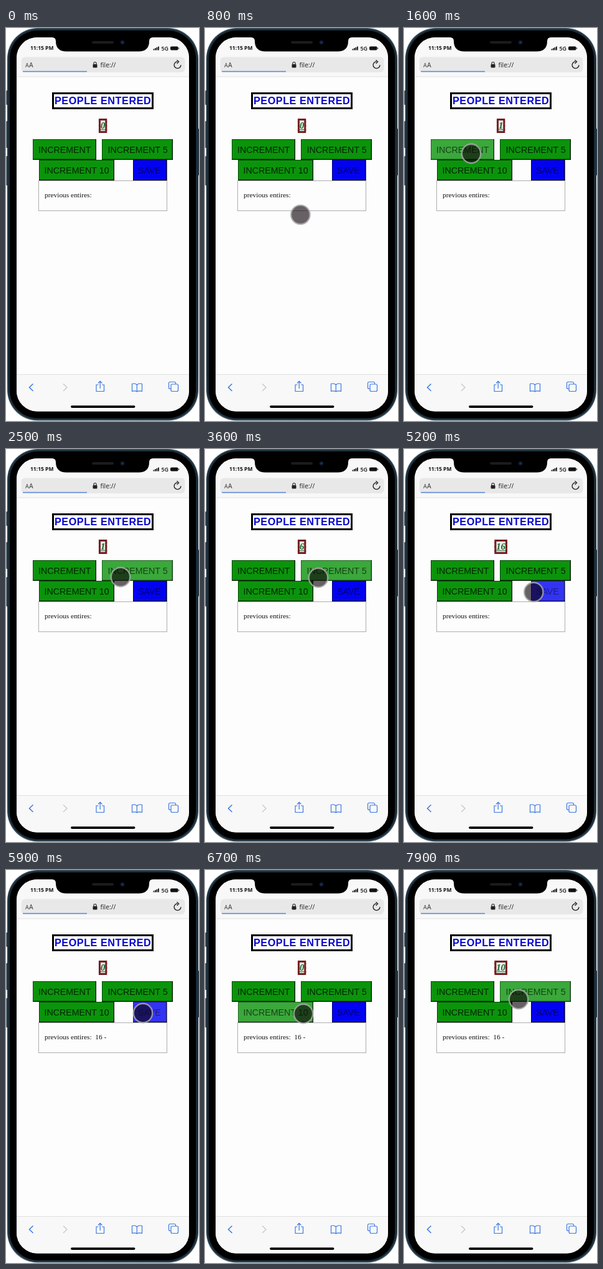
Write an HTML page with a canvas that moves like this. It is 310x629 px and loops after 8000 ms.

```html
<!DOCTYPE html>
<html lang="en">
<head>
<meta charset="utf-8">
<title>People counter</title>
<style>
html, body { margin: 0; width: 100%; height: 100%; overflow: hidden; background: #fff; }
canvas { display: block; width: 100%; height: 100%; }
</style>
</head>
<body>
<canvas id="stage"></canvas>
<script>
const W = 310, H = 629, LOOP = 8000, STEP = 100;
const canvas = document.getElementById('stage');
const ctx = canvas.getContext('2d');
const SANS = '"Liberation Sans", Arial, sans-serif';
const SERIF = '"Liberation Serif", Times, serif';
const UI = '"Open Sans", "Noto Sans", sans-serif';
const BLUE = '#3e78e0';
const GREEN = '#0b940b', GREEN_INK = 'rgba(0,0,0,.76)';

const buttons = [
  { label: 'INCREMENT', x: 43, y: 178, w: 102, tx: 52, fill: GREEN, ink: GREEN_INK },
  { label: 'INCREMENT 5', x: 154, y: 178, w: 114, tx: 163.5, fill: GREEN, ink: GREEN_INK },
  { label: 'INCREMENT 10', x: 53, y: 211, w: 121, tx: 61.5, fill: GREEN, ink: GREEN_INK },
  { label: 'SAVE', x: 204, y: 211, w: 54.5, tx: 212, fill: '#0202f2', ink: 'rgba(0,0,0,.55)' }
];
const BUTTON_H = 33;

// pointer stops: time, x, y
const path = [
  [400, 205, 420], [500, 178, 352], [600, 178, 352], [1100, 108, 201],
  [2100, 108, 201], [2500, 184, 205], [3500, 184, 205], [3600, 182, 206],
  [4000, 145, 229], [4900, 145, 229], [5300, 220, 229], [6300, 220, 229],
  [6700, 158, 230], [7700, 158, 230], [7900, 184, 207]
];
const presses = [[1400, 1600], [2900, 3100], [4300, 4500], [5700, 5900], [7000, 7300]];
const counts = [[0, 0], [1600, 1], [3100, 6], [4500, 16], [5900, 0], [7300, 10]];
const SAVED_AT = 5900;

function pointerAt(t) {
  if (t < path[0][0]) return null;
  const i = path.findIndex(p => p[0] > t);
  if (i < 0) return path[path.length - 1].slice(1);
  const [t0, x0, y0] = path[i - 1], [t1, x1, y1] = path[i];
  const u = (t - t0) / (t1 - t0), k = u * u * (3 - 2 * u);
  return [x0 + (x1 - x0) * k, y0 + (y1 - y0) * k];
}

function countAt(t) {
  return counts.filter(c => c[0] <= t).pop()[1];
}

function rect(x, y, w, h, color) {
  ctx.fillStyle = color;
  ctx.fillRect(x, y, w, h);
}

function round(x, y, w, h, r, color) {
  ctx.fillStyle = color;
  ctx.beginPath();
  ctx.roundRect(x, y, w, h, r);
  ctx.fill();
}

function disc(x, y, r, color) {
  ctx.fillStyle = color;
  ctx.beginPath();
  ctx.arc(x, y, r, 0, Math.PI * 2);
  ctx.fill();
}

function text(str, x, y, font, color, spacing = 0) {
  ctx.font = font;
  ctx.letterSpacing = spacing + 'px';
  ctx.fillStyle = color;
  ctx.fillText(str, x, y);
}

function stroke(d, color, width) {
  ctx.strokeStyle = color;
  ctx.lineWidth = width;
  ctx.stroke(new Path2D(d));
}

function drawBody() {
  for (const [y, h] of [[100, 23], [149, 43], [205, 47]]) round(0.5, y, 4, h, 1, '#2b3b47');
  round(306, 161, 4, 75, 1, '#2b3b47');
  const metal = ctx.createLinearGradient(0, 0, 0, H);
  metal.addColorStop(0, '#3d5261');
  metal.addColorStop(0.12, '#20323f');
  metal.addColorStop(0.88, '#20323f');
  metal.addColorStop(1, '#4c6372');
  round(2, 0, 307, 628.5, 49, metal);
  round(3.5, 1.5, 304, 625.5, 47.5, '#1b2c38');
  round(6, 4, 299, 620.5, 45, '#000');
}

function drawNotch() {
  ctx.fillStyle = '#000';
  ctx.fill(new Path2D('M74 14H236V15Q230 15 230 21Q230 37.5 213 37.5H97Q80 37.5 80 21Q80 15 74 15Z'));
  round(138, 21, 35, 4, 2, '#1c1c1f');
  disc(187, 23, 3.6, '#0b1525');
  disc(187, 23, 1.8, '#1c3658');
}

function drawStatus() {
  text('11:15 PM', 39, 35.3, '700 8.5px ' + UI, '#111');
  for (let i = 0; i < 4; i++) rect(236.5 + i * 2.5, 33.5 - i * 1.3, 1.8, 2 + i * 1.3, '#111');
  text('5G', 249.5, 35.6, '600 8.8px ' + UI, '#111');
  round(264, 29.5, 12.5, 6, 1.8, '#111');
  rect(277, 31.5, 1.2, 2, '#333');
}

function drawAddressBar() {
  rect(17, 15, 277, 63, '#f8f8f8');
  rect(17, 77.5, 277, 1, '#e3e3e3');
  round(24.5, 46.5, 263, 24.5, 6, '#e8e8e9');
  text('A', 31, 63.3, '9px ' + UI, '#333');
  text('A', 37, 63.3, '10.5px ' + UI, '#333');
  round(139.5, 58, 7, 5.5, 1, '#222');
  stroke('M141 58.5V56.5A2 2 0 0 1 145 56.5V58.5', '#222', 1.2);
  text('file://', 151.5, 62.8, '10.3px ' + UI, '#222');
  stroke('M275.5 53.8A5.4 5.4 0 1 0 280.9 59.2', '#222', 1.4);
  stroke('M274.5 51.2L277.6 54L274.5 57', '#222', 1.3);
  rect(27, 68.8, 103, 1.6, '#5d8ade');
}

function drawToolbar() {
  rect(17, 554, 277, 60, '#f8f8f8');
  rect(17, 554, 277, 1, '#e0e0e0');
  stroke('M43.5 569.5L37.5 575.3L43.5 581', BLUE, 1.5);
  stroke('M92 569.5L98 575.3L92 581', '#c9c9cb', 1.4);
  stroke('M148.5 571H145V581.5H157.5V571H154M151.2 577V565.5M148 568.5L151.2 565.3L154.4 568.5', BLUE, 1.2);
  stroke('M210.3 571Q207 568 202.5 569.5V581.5Q207 580 210.3 582Q213.5 580 218.5 581.5V569.5Q213.5 568 210.3 571V582', BLUE, 1.2);
  ctx.beginPath();
  ctx.roundRect(265, 570, 11.5, 11.5, 2);
  ctx.stroke();
  stroke('M265 577.5H263.5Q261.5 577.5 261.5 575.5V568.5Q261.5 566.5 263.5 566.5H270.5Q272.5 566.5 272.5 568.5V570', BLUE, 1.2);
  round(104, 604.3, 103.5, 3.6, 1.8, '#000');
}

function drawTitle() {
  rect(74, 103, 163, 27, '#000');
  rect(77, 106, 157, 21, '#fff');
  text('PEOPLE ENTERED', 78, 122, 'bold 16.2px ' + SANS, '#0606cc', 0.55);
}

// Alternating dashes with a solid piece at every corner
function dashedFrame(x, y, w, h, b, color, gap) {
  rect(x, y, w, h, color);
  const pieces = len => 2 * Math.round(len / 8) + 1;
  const nx = pieces(w), ny = pieces(h), dx = w / nx, dy = h / ny;
  for (let i = 1; i < nx; i += 2)
    for (const edge of [y, y + h - b]) rect(x + i * dx, edge, dx, b, gap);
  for (let i = 1; i < ny; i += 2)
    for (const edge of [x, x + w - b]) rect(edge, y + i * dy, b, dy, gap);
}

function drawCounter(n) {
  const str = String(n), inner = 7.3 * str.length, w = inner + 6;
  const x = 155.6 - w / 2, y = 145, h = 23;
  dashedFrame(x, y, w, h, 3, '#8e121b', '#5b2a2a');
  rect(x + 3, y + 3, inner, h - 6, '#e4ebe4');
  text(str, x + 3, 161, 'italic bold 14.6px ' + SERIF, '#1c5f28');
  rect(x + 3, 162.3, inner, 1, '#1c5f28');
}

function drawButton(b, hover) {
  ctx.globalAlpha = hover ? 0.8 : 1;
  rect(b.x, b.y, b.w, BUTTON_H, b.fill);
  text(b.label, b.tx, b.y + 21.5, '14.2px ' + SANS, b.ink);
  const light = 'rgba(0,0,0,.5)', dark = 'rgba(0,0,0,.85)';
  rect(b.x, b.y, b.w, 1, light);
  rect(b.x, b.y + 1, 1, BUTTON_H - 1, light);
  rect(b.x + b.w - 1.3, b.y, 1.3, BUTTON_H, dark);
  rect(b.x, b.y + BUTTON_H - 1.3, b.w, 1.3, dark);
  ctx.globalAlpha = 1;
}

function drawEntries(saved) {
  ctx.strokeStyle = '#adadad';
  ctx.lineWidth = 1;
  ctx.strokeRect(52.5, 244.5, 206, 48);
  text('previous entires:' + (saved ? '\u00a0 16 -' : ''), 62, 270.6, '11.4px ' + SERIF, '#111');
}

function drawPointer([x, y], pressed) {
  const r = pressed ? 13.5 : 15.2;
  disc(x, y, r, 'rgba(12,0,8,.62)');
  ctx.strokeStyle = 'rgba(172,172,172,.82)';
  ctx.lineWidth = 2.4;
  ctx.beginPath();
  ctx.arc(x, y, r, 0, Math.PI * 2);
  ctx.stroke();
}

function draw(t) {
  const pointer = pointerAt(t);
  const over = b => pointer && pointer[0] >= b.x && pointer[0] < b.x + b.w &&
    pointer[1] >= b.y && pointer[1] < b.y + BUTTON_H;

  rect(0, 0, W, H, '#fff');
  drawBody();
  ctx.save();
  ctx.beginPath();
  ctx.roundRect(17, 15, 277, 598.5, 33);
  ctx.clip();
  rect(17, 15, 277, 599, '#fdfdfd');
  drawAddressBar();
  drawStatus();
  drawTitle();
  drawCounter(countAt(t));
  drawEntries(t >= SAVED_AT);
  buttons.forEach(b => drawButton(b, over(b)));
  drawToolbar();
  if (pointer) drawPointer(pointer, presses.some(([a, b]) => t >= a && t < b));
  ctx.restore();
  drawNotch();
}

function resize() {
  const dpr = window.devicePixelRatio || 1;
  canvas.width = Math.round(innerWidth * dpr);
  canvas.height = Math.round(innerHeight * dpr);
}

const start = performance.now();
function frame() {
  const t = (performance.now() - start) % LOOP;
  ctx.setTransform(canvas.width / W, 0, 0, canvas.height / H, 0, 0);
  draw(Math.floor(t / STEP) * STEP);
  requestAnimationFrame(frame);
}

addEventListener('resize', resize);
resize();
frame();
</script>
</body>
</html>
```
